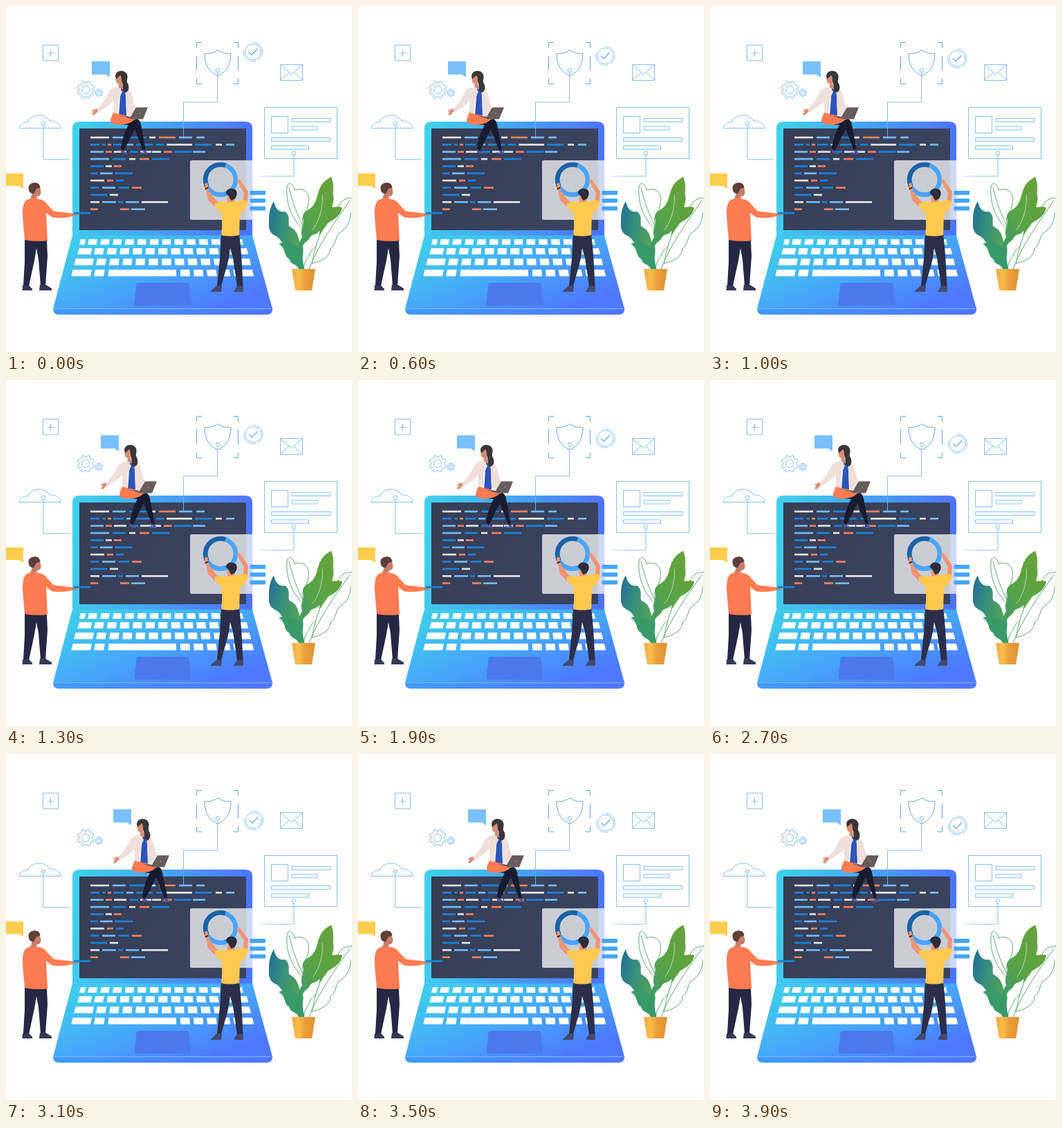
These frames come from a looping animation (500 by 500 pixels, 4 s). An HTML page:

```html
<!DOCTYPE html>
<html lang="en">
<head>
<meta charset="utf-8">
<title>Team building an app</title>
<style>
  html, body { margin: 0; width: 100%; height: 100%; overflow: hidden; background: #fff; }
  svg { display: block; width: 500px; height: 500px; }
  .line { fill: none; stroke: #74b9f5; stroke-width: .9; }
  .slide { animation: 4s steps(40) infinite; }
  #woman { animation-name: across; }
  #check { animation-name: down; }
  @keyframes across { to { transform: translateX(40px); } }
  @keyframes down { to { transform: translate(1px, 38px); } }
</style>
</head>
<body>
<svg viewBox="0 0 500 500">
  <defs>
    <linearGradient id="lid" x2="1" y2=".1"><stop stop-color="#3fd3ea"/><stop offset=".5" stop-color="#45a5f6"/><stop offset="1" stop-color="#4d74ff"/></linearGradient>
    <linearGradient id="base" gradientUnits="userSpaceOnUse" x1="198" y1="318" x2="250" y2="458">
      <stop stop-color="#40c9ec"/><stop offset=".5" stop-color="#46a6fa"/><stop offset="1" stop-color="#4e78ff"/>
    </linearGradient>
    <linearGradient id="edge"><stop stop-color="#3f9cfb"/><stop offset="1" stop-color="#5273ff"/></linearGradient>
    <linearGradient id="screen" x2="1" y2=".3"><stop stop-color="#373e55"/><stop offset="1" stop-color="#3a445f"/></linearGradient>
    <linearGradient id="teal" x2="1" y2=".4"><stop stop-color="#236a98"/><stop offset=".4" stop-color="#338d80"/><stop offset="1" stop-color="#56a650"/></linearGradient>
    <linearGradient id="green" x1="1" x2=".2" y2="1"><stop stop-color="#6aa238"/><stop offset=".6" stop-color="#58a345"/><stop offset="1" stop-color="#3a9b6c"/></linearGradient>
    <linearGradient id="pot"><stop stop-color="#f3a93e"/><stop offset=".3" stop-color="#fdbd4e"/><stop offset=".55" stop-color="#eaa03a"/><stop offset="1" stop-color="#dd9232"/></linearGradient>
    <linearGradient id="fade" gradientUnits="userSpaceOnUse" x1="362" x2="416" y1="0" y2="0"><stop stop-color="#74b9f5" stop-opacity=".2"/><stop offset=".5" stop-color="#74b9f5"/></linearGradient>
  </defs>

  <path d="M169 78.5H193" stroke="#f4f6f9"/>

  <!-- outline icons -->
  <g class="line">
    <path d="M53.5 56.5H75.5V79H53.5ZM64.500 63V73.500M59.500 68.200H70"/>
    <path d="M396.500 84.500H428.500V107.500H396.500ZM396.500 85L412.500 98.500L428.500 85M396.500 107L409 95.500M428.500 107L416 95.500"/>
    <path d="M19 176.500C20 171 25 167.500 32 167.500C34 161 41 158 48 158C55 158 60 161 63 166C71 165 78 170 79.500 176.500Z"/>
    <circle cx="54" cy="170" r="2.800" fill="#fff"/>
    <path d="M54 173V221.800H92"/>
    <g id="gears"></g>
    <path d="M373.500 146.500H478.500V220.500H373.500ZM383.500 159.500H407.500V183.500H383.500ZM413 162.500H468.500V167.500H413ZM413 174H450V179H413ZM383.500 190.500H468.500V195.500H383.500ZM383.500 202H437.500V207H383.500Z"/>
    <path d="M416 216V246H364" stroke="url(#fade)"/>
    <circle cx="416" cy="213" r="2.800" fill="#fff"/>
  </g>
  <path d="M0 242H25V264L19 260H0Z" fill="#ffcd4d"/>

  <!-- laptop -->
  <path d="M96 333V177Q96 167 106 167H346Q356 167 356 177V333Z" fill="url(#lid)"/>
  <path d="M106 177H347V324H106Z" fill="url(#screen)"/>
  <path d="M96 331.500H356L385 437.500H68Z" fill="url(#base)"/>
  <path d="M68 437H385V439Q384 446 377 446H76Q69 446 68 439Z" fill="url(#edge)"/>
  <path d="M69 437.400H384" stroke="#8cc6ff" stroke-width=".9"/>
  <path d="M192 400H261Q264 400 264.500 403L267.500 430Q268 433 265 433H188Q185 433 185.500 430L188.500 403Q189 400 192 400Z" fill="#4c79ec"/>
  <g id="keys" fill="#fff"></g>
  <g id="code" stroke-width="2.700"></g>

  <g class="line">
    <path d="M275.500 60V52.500H283M328.500 52.500H335.500V60M335.500 105V112.500H328.500M283 112.500H275.500V105M275.500 72V93M335.500 72V93" stroke="#559fdd"/>
    <path d="M306 63.500C300 68 293 69 287 68.500C287 83 292 95 306 101C320 95 325 83 325 68.500C319 69 312 68 306 63.500Z" stroke="#559fdd"/>
    <circle cx="306" cy="93" r="2.800" fill="#fff"/>
    <path d="M305.700 96V139H256.500V190"/>
  </g>
  <g id="check" class="line slide">
    <circle cx="357" cy="66.300" r="11.500"/>
    <path d="M357 52.600A13.700 13.700 0 0 1 364 78.100M361 79.400A13.700 13.700 0 0 1 343.500 64" stroke-width=".8"/>
    <path d="M350.500 66.300L355 70.500L363.500 61.500" stroke="#559fdd" stroke-width="1.100"/>
  </g>

  <!-- chart panel -->
  <rect x="266" y="223" width="91" height="86" rx="2" fill="#f6f6f8" fill-opacity=".77"/>
  <g fill="none" stroke-width="6.500">
    <circle cx="310" cy="251" r="21.800" stroke="#48a4f8"/>
    <path d="M290.500 261A21.800 21.800 0 0 1 317 230.400" stroke="#1c61a5"/>
  </g>
  <g fill="#45a5fb">
    <rect x="352.500" y="267" width="22.500" height="6" rx="1"/>
    <rect x="352.500" y="278.300" width="22.500" height="6" rx="1"/>
    <rect x="352.500" y="289.600" width="22.500" height="6" rx="1"/>
  </g>

  <!-- man in orange -->
  <path d="M27 337L59 338L60 362L57 404H50L47 366L44 350L41 368L33 405L25 404L27 370Z" fill="#242844"/>
  <path d="M24 404L33 403.500L38 409V411H23.500ZM49 403L56 402L66 408V411H48Z" fill="#343854"/>
  <path d="M43 263L49 262L50.500 269C50 274 48 275.500 44.500 275V281L35 280L38 270Z" fill="#c67f69"/>
  <path d="M94 300L103 299L106 301.500L96 304Z" fill="#c67f69"/>
  <path d="M32.500 263C32 255 45 253 48 258L49.500 261.500C49 264.500 44 262 43 266L40 271.500C35 271 32.500 268 32.500 263Z" fill="#5e3f3b"/>
  <path d="M31 280C35 277.500 40 278 45 278.500C51 279.500 56 281 59 286L69 296.500L95 299.500V304C85 306.500 72 307 66 305L58 299L60 339C48 340.500 37 340 27 338C26 322 24 310 24 298C24.500 288 26 282 31 280Z" fill="#ff7b52"/>
  <path d="M98 299.300H122" stroke="#1781dc" stroke-width="2.800"/>

  <!-- man in yellow -->
  <path d="M311 329H337C339 345 341 365 342.500 405H334L328 364L324 350L322 364C318 382 314 393 311 405L305 404L309 365Z" fill="#2b2f4c"/>
  <path d="M304 404L312 405L311 413H296C296 410 301 409 304 404ZM333.500 405L342.500 404.500L343 413H329Z" fill="#454a6c"/>
  <path d="M287 257L291 255.500L294 268L306 284L304 292L292 281ZM333 252L337.500 250L350 268L349 283L342 286L344 270ZM320 274L331 276L330 287H320Z" fill="#ee9575"/>
  <path d="M287.500 264.500L292.500 262.500" stroke="#3a3444" stroke-width="2"/>
  <path d="M302 285C310 282 316 284 324 283.500C332 283 338 281 342 280L350 282C349 290 344 297 338 301L337 331C328 333 318 333 311 331C313 318 312 306 311 298C307 296 304 293 302 290Z" fill="#ffc94e"/>
  <path d="M318 271C317 264 327 261.500 332 266C335.500 270 333 275 330.500 279L326 281C323 280 324 275 318 271Z" fill="#2e2d3b"/>

  <!-- plant -->
  <g fill="#fff" stroke="#4f9f63" stroke-width=".9">
    <path d="M428 322C416 309 404 290 406 262C408 252 415 257 417 266C428 262 440 267 437 285C435 299 427 302 429 313L430 370M409 262C414 285 421 301 429 318"/>
    <path d="M500 278C485 276 480 290 476 296C463 298 466 312 462 319C452 326 448 345 442 372C456 369 469 362 469 350C478 344 476 332 482 328C494 320 498 310 498 298M497 281C474 314 452 344 438 380"/>
  </g>
  <path d="M387 282C389 293 395 299 403 297C413 304 406 315 410 319C422 324 423 336 426 348L431 380H424C421 364 416 353 408 351C399 343 395 335 391 333C378 328 380 316 380 310C380 296 383 289 387 282Z" fill="url(#teal)"/>
  <path d="M470 247C475 258 472 270 473 275C475 283 470 288 472 291C480 289 486 290 486 292C483 303 474 309 466 313C457 321 459 327 450 333C436 344 432 358 431 380H426C425 360 419 346 428 334C424 322 433 316 429 307C428 295 439 296 444 288C453 278 447 258 470 247Z" fill="url(#green)"/>
  <path d="M453 324C455 334 449 338 449 344C447 352 440 351 439 359C436 365 432 366 430 380C425 369 430 358 429 351C427 341 436 342 439 334C443 328 448 332 453 324Z" fill="#fff" stroke="#4f9f63" stroke-width=".9"/>
  <path d="M394 344C404 338 423 343 427 356L431 380H423C419 371 413 376 409 365C401 362 405 349 394 344Z" fill="#389a68"/>
  <path d="M447 333L431 378M457 273C459 294 450 315 443 323" fill="none" stroke="#d7eddb" stroke-width=".7"/>
  <path d="M413 380H447L442 411H418Z" fill="url(#pot)"/>

  <!-- seated woman -->
  <g id="woman" class="slide">
    <path d="M124 80H150V103L144 99H124Z" fill="#78c0ff"/>
    <path d="M132 148L126 150L123 153L127 152L124 157L127 158L133 152ZM159 101L167 100L167 112L170 119H162L163 112.500C159 113 158 107 159 101Z" fill="#d98d74"/>
    <path d="M164 168L190 163C196 167 195 174 197 182L202 209L199 211L188 183L186 178L170 210L166 209C167 194 171 183 177 172L165 171Z" fill="#171c31"/>
    <path d="M166 207L169 209L175 212V214L166 212ZM198 208L202 209L206 214L195 213.500L194 211L199 212Z" fill="#5658a0"/>
    <path d="M166 119L173 121L174 158H163Z" fill="#2c55ba"/>
    <path d="M156 118L163 117L168 124L163 135L162 157L155 156V137C149 144 141 149 134 153L131 149C139 142 145 133 149 123ZM171 118C181 119 183 130 184 137L188 148L185 158L174 157L173 130Z" fill="#eedfdb"/>
    <path d="M155 154C163 157 172 157 178 160L186 164C180 170 172 171.500 163 171.500C153 172 149 168 152 161Z" fill="#ff7b52"/>
    <path d="M166 158.500L180 160L188 146.500H205L198 163.500H182Z" fill="#655c5b"/>
    <circle cx="193" cy="155" r="1" fill="#968d8b"/>
    <path d="M158 101C159 92 172 91.500 175 99C177 104 173 108 176 112C179 118 177 125 172 125C167 124 170 117 168 112C166 107 168 103 165 100C163 103 161 103 159 106Z" fill="#3a3739"/>
  </g>
</svg>
<script>
  const put = (id, html) => { document.getElementById(id).innerHTML = html; };

  // Code lines: colour, start x, length
  const ink = { W: '#e2e3e5', B: '#1a83de', L: '#70bbf6', O: '#f0815f' };
  const code = [
    'W122,27 L154,19 B178,25 W207,9 O221,24 L250,19 L275,12',
    'B122,13 B139,5 O147,5 B155,15 L174,10 B188,24 B217,11 W232,37 B273,24 W303,9 L318,12',
    'L122,19 O144,9 W156,18 B179,12 W194,16 W211,13 O228,12 B243,25 L270,18',
    'L122,27 B154,19 W178,9 O193,14 B211,25',
    'B122,19 W144,9 O156,11',
    'B122,11 L136,18 B157,26',
    'W122,20 O146,9 B159,11',
    'B122,12 L139,19 B163,15 O182,14',
    'B122,24 W150,12',
    'W122,13 L139,20 B162,7 L173,19 W196,38',
    'O122,11 O165,13 L181,20'
  ];
  put('code', code.map((row, i) => row.replace(/(\w)(\d+),(\d+) ?/g, (_, c, x, w) =>
    `<path d="M${x} ${190 + i * 10.37}h${w}" stroke="${ink[c]}"/>`)).join(''));

  // Keys fan out from the middle as the base widens
  const key = (x, w, y, h) => {
    const px = (v, dy) => (226.5 + (v - 226.5) * (1 + dy * .00195)).toFixed(1);
    return `<path d="M${px(x, -h / 2)} ${y}H${px(x + w, -h / 2)}L${px(x + w, h / 2)} ${y + h}H${px(x, h / 2)}Z"/>`;
  };
  const run = (x, pitch, n, w, y, h) =>
    Array.from({ length: n }, (_, i) => key(x + i * pitch, w, y, h)).join('');
  put('keys',
    key(107, 7.5, 337, 8) + run(119, 17.8, 12, 12.3, 337, 8) + key(333, 9, 337, 8) +
    key(104.5, 19, 350, 9) + run(128, 18.45, 11, 13, 350, 9) + key(332, 17, 350, 9) +
    key(99.5, 26.5, 365, 9.5) + run(131, 18.85, 11, 13.3, 365, 9.5) + key(338, 15, 365, 9.5) +
    key(95.5, 27.5, 381, 9.5) + key(128, 14, 381, 9.5) + key(148, 98, 381, 9.5) +
    run(252, 19.3, 4, 13.6, 381, 9.5) + key(329, 28, 381, 9.5));

  const gear = (cx, cy, r, tooth, n, hub) => {
    const at = (rad, a) => `${(cx + rad * Math.cos(a)).toFixed(1)} ${(cy + rad * Math.sin(a)).toFixed(1)}`;
    const step = 2 * Math.PI / n;
    let d = '';
    for (let i = 0; i < n; i++) {
      const a = (i + .5) * step;
      d += `${i ? 'L' : 'M'}${at(r, a - step * .3)}L${at(r + tooth, a - step * .2)}` +
        `L${at(r + tooth, a + step * .2)}L${at(r, a + step * .3)}`;
    }
    return `<path d="${d}Z"/><circle cx="${cx}" cy="${cy}" r="${hub}"/>`;
  };
  put('gears', gear(115.3, 121, 9.8, 2.6, 8, 5.6) + gear(134.3, 125.3, 4.3, 1, 10, 2.5));
</script>
</body>
</html>
```
